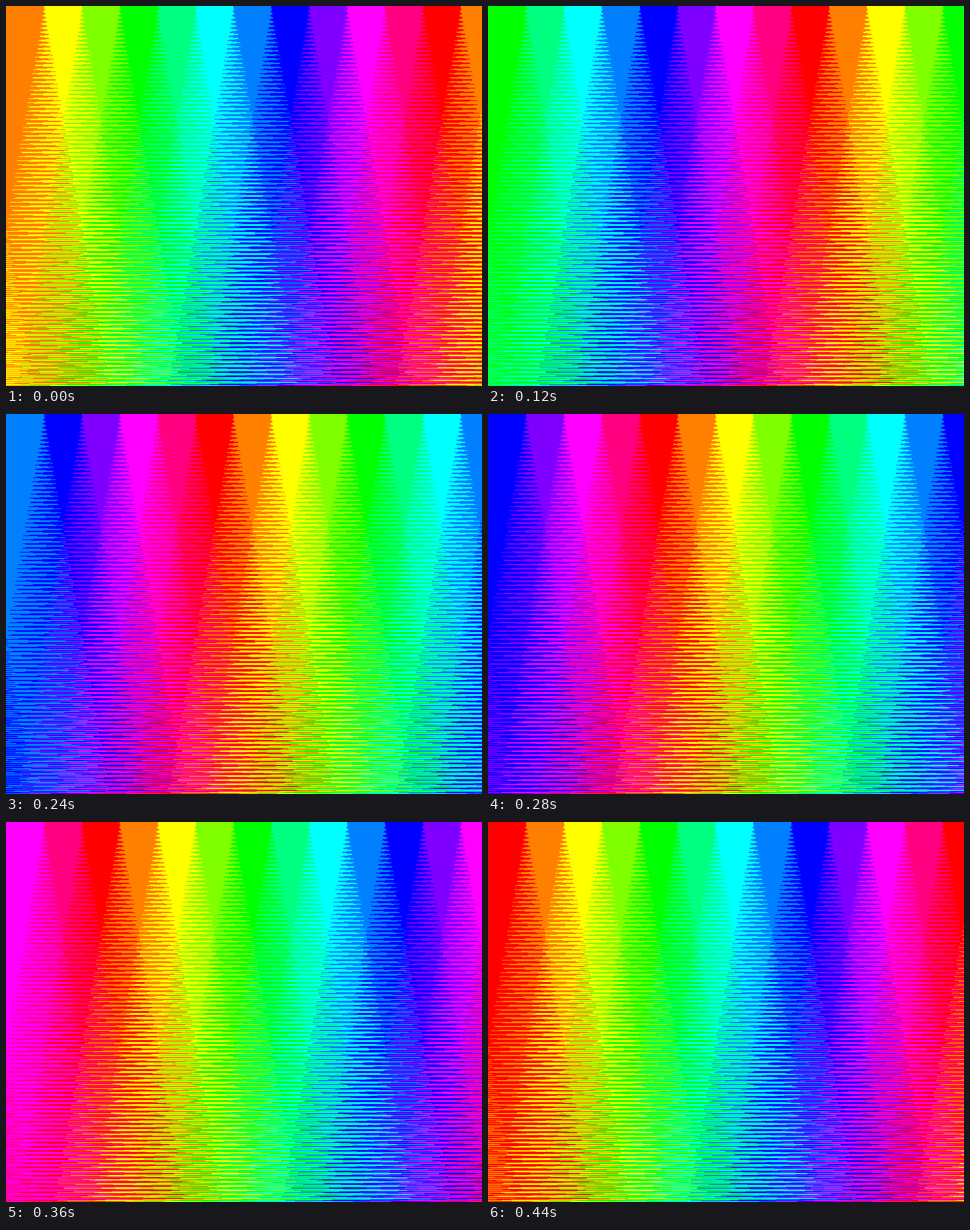
An HTML page with a canvas for the animation above (0.48 s loop, 720 by 576 pixels).

```html
<!DOCTYPE html>
<html lang="en">
<head>
<meta charset="utf-8">
<title>Rainbow comb</title>
<style>
  html, body { margin: 0; width: 100%; height: 100%; overflow: hidden; }
  canvas { display: block; }
</style>
</head>
<body>
<canvas id="stage" width="720" height="576"></canvas>
<script>
const W = 720, H = 576, STEP = 40, HUES = 12;
const RAD = Math.PI / 180;
const ctx = document.getElementById('stage').getContext('2d');
const image = ctx.createImageData(W, H);
const pixels = new Uint32Array(image.data.buffer);
const bands = new Uint8Array(W * H);

// One band per radian of x; each row is shifted by a wave that grows downwards.
for (let y = 0; y < H; y++) {
  const shift = 10 * y * RAD * Math.sin(y);
  for (let x = 0; x < W; x++) {
    bands[y * W + x] = Math.floor(Math.abs((x + shift) * RAD));
  }
}

// Fully saturated colour wheel in 30 degree steps, packed as ABGR.
const channel = (hue, offset) => {
  const k = (hue + offset) % HUES;
  return Math.round(255 * Math.max(0, Math.min(1, Math.abs(k - 6) / 2 - 1)));
};
const wheel = Uint32Array.from({ length: HUES }, (_, hue) =>
  (255 << 24 | channel(hue, 4) << 16 | channel(hue, 8) << 8 | channel(hue, 0)) >>> 0);

let shown = -1;
function draw() {
  const step = Math.floor(performance.now() / STEP) % HUES;
  if (step !== shown) {
    shown = step;
    for (let i = 0; i < pixels.length; i++) {
      pixels[i] = wheel[(bands[i] + step + 1) % HUES];
    }
    ctx.putImageData(image, 0, 0);
  }
  requestAnimationFrame(draw);
}
draw();
</script>
</body>
</html>
```
